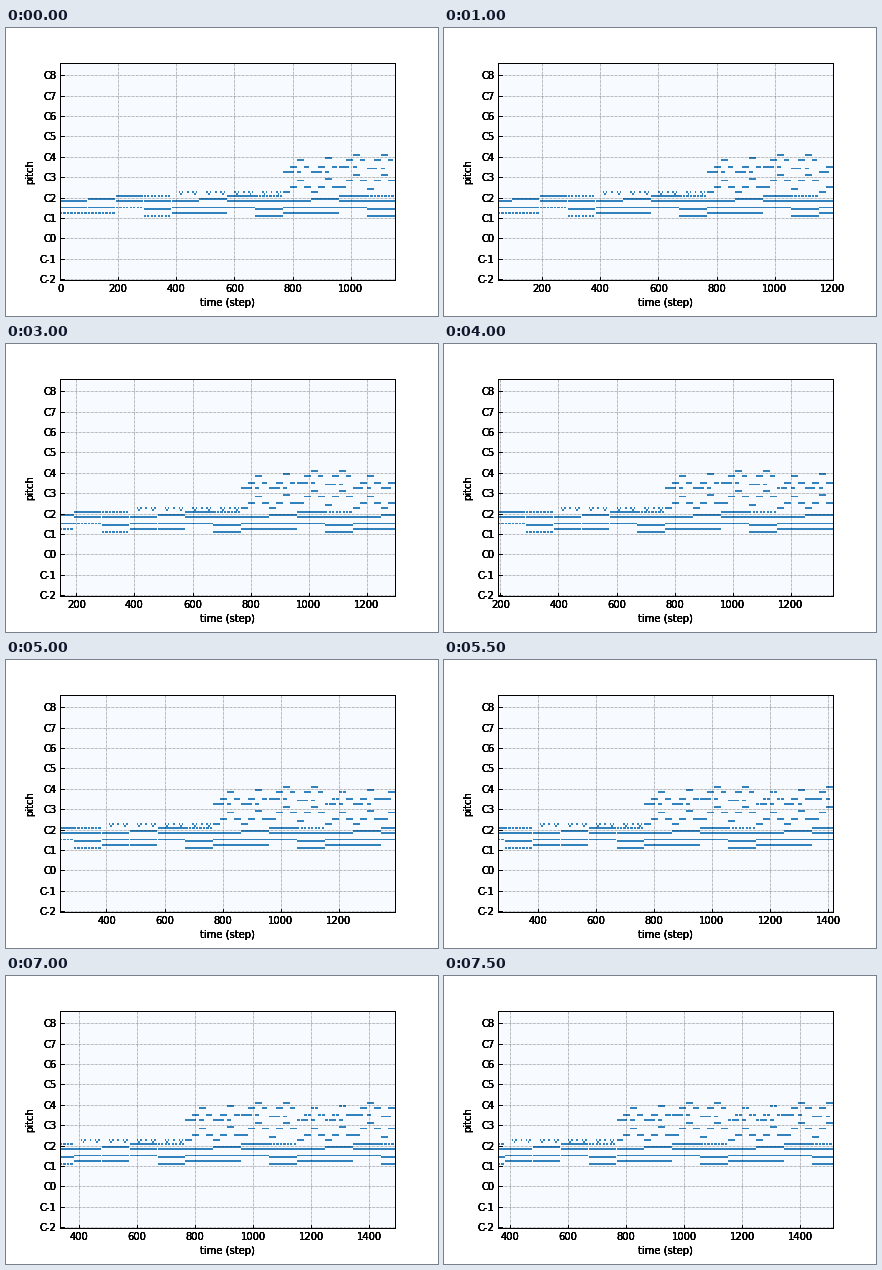
Recreate the animation shown at these times as a matplotlib script. Size 432 px wide and 288 px high, loop 8000 ms.

```python
import numpy as np
import matplotlib.pyplot as plt
from matplotlib.animation import FuncAnimation

BEAT, BAR, WINDOW = 24, 96, 1152
FRAMES, BARS = 16, 16
LEVEL = 0.68

# Chord tones of the four-bar progression: bass, middle, top.
CHORDS = [(39, 42, 46), (39, 42, 47), (42, 46, 49), (37, 41, 46)]
# Arpeggio roots, thirds and tops over the same bars.
ARPEGGIOS = [(51, 54, 58), (51, 54, 59), (54, 58, 61), (53, 58, 61)]

roll = np.zeros((128, BAR * BARS))


def note(pitch, start, length):
    roll[pitch, start:start + length] = LEVEL


def hold(pitch, start):
    note(pitch, start, BAR - 1)


def pulse(pitch, start):
    for t in range(start, start + BAR, 12):
        note(pitch, t, 8)


def add_chord(bar):
    start = bar * BAR
    bass, mid, top = CHORDS[bar % 4]
    (pulse if bar < 4 else hold)(bass, start)
    hold(mid, start)
    hold(top, start)
    if bar % 4 == 3:
        pulse(49, start)


def add_riff(start):
    for offset, pitch in [(24, 51), (30, 50), (36, 51), (54, 51),
                          (72, 51), (78, 50), (84, 51)]:
        note(pitch, start + offset, 5)


def add_arpeggio(bar):
    start = bar * BAR
    low, mid, top = ARPEGGIOS[bar % 4]
    for i, pitch in enumerate((low, mid, top, mid)):
        t = start + i * BEAT
        note(pitch, t, BEAT - 1)
        if bar < 12:
            note(pitch + 12, t, 18 if i == 3 else BEAT - 1)
        else:
            note(pitch + 12, t, 10)
            note(pitch + 12, t + 12, 11)
    note(low + 12, start + BEAT, 12)
    note(low + 12, start + 2 * BEAT, 14)


for bar in range(BARS):
    add_chord(bar)
    if 4 <= bar < 8:
        add_riff(bar * BAR)
    elif bar >= 8:
        add_arpeggio(bar)

plt.rcParams.update({"font.family": "DejaVu Sans", "font.size": 10})
fig = plt.figure(figsize=(6, 4), dpi=72, facecolor="white")
box = [0.125, 0.125, 0.775, 0.755]
ax = fig.add_axes(box)
ax.imshow(roll, cmap="Blues", aspect="auto", vmin=0, vmax=1,
          origin="lower", interpolation="none")
ax.set_yticks(np.arange(0, 128, 12), [f"C{i - 2}" for i in range(11)])
ax.grid(color="k", linestyle=":", linewidth=0.5)

# Stacked copies of the frame and labels give the hard, heavy text edges.
layers = [ax] + [fig.add_axes(box, sharex=ax, sharey=ax, label=f"layer{i}")
                 for i in range(4)]
for layer in layers:
    layer.set_xlabel("time (step)")
    layer.set_ylabel("pitch")
    layer.tick_params(direction="in")
    if layer is not ax:
        layer.patch.set_visible(False)


def update(i):
    start = i * BEAT
    ax.set_xlim(start, start + WINDOW)
    return []


anim = FuncAnimation(fig, update, frames=FRAMES, interval=500,
                     init_func=lambda: update(0), repeat=True, repeat_delay=0)
plt.show()
```
